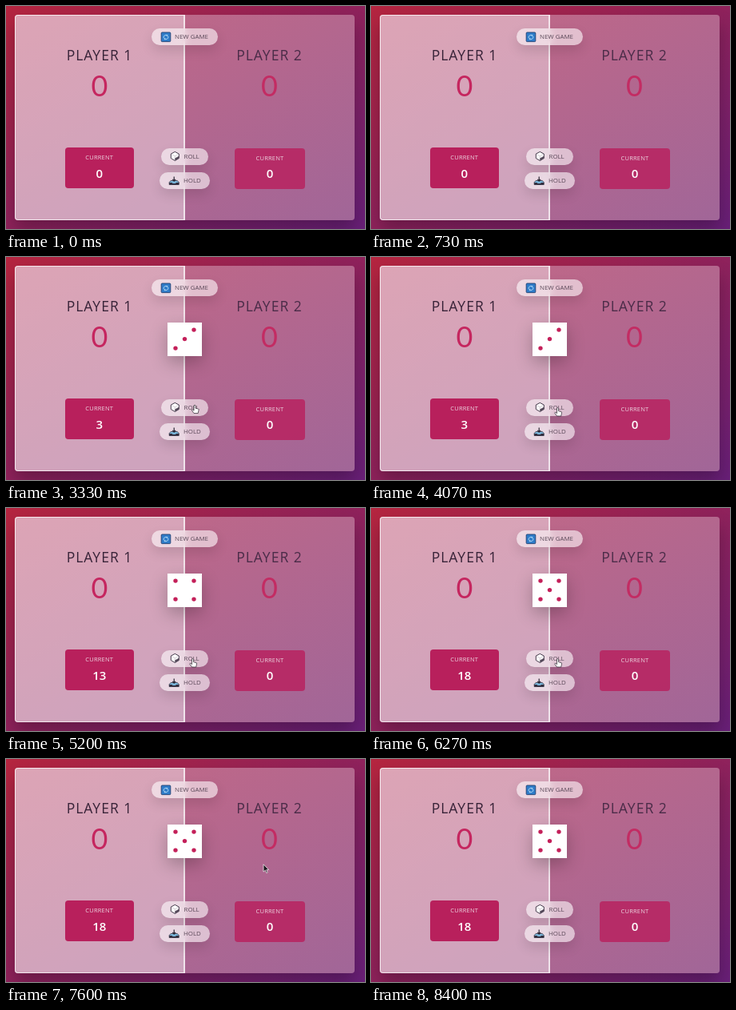
An HTML page that plays this animation: 449 by 279 pixels, repeating every 8540 ms.

```html
<!DOCTYPE html>
<html lang="en">
<head>
<meta charset="utf-8">
<title>Dice game</title>
<style>
  html, body { margin: 0; width: 100%; height: 100%; overflow: hidden; }
  body {
    position: relative;
    background: linear-gradient(to top left, #681f78, #b5253f);
    font-family: "Open Sans", "Noto Sans", sans-serif;
  }
  div, svg { position: absolute; box-sizing: border-box; }
  .card {
    left: 10.5px; top: 11px; width: 425.5px; height: 256.5px;
    border-radius: 4px;
    background: linear-gradient(to top left, #a16698, #c66884);
    box-shadow: 0 12px 21px rgba(0, 0, 0, .25);
  }
  .active {
    left: 10.5px; top: 11px; width: 213.5px; height: 256.5px;
    border: 1px solid rgba(255, 255, 255, .75);
    border-right: 2px solid rgba(255, 255, 255, .7);
    border-radius: 4px 0 0 4px;
    background: rgba(255, 255, 255, .4);
  }
  .player { top: 0; width: 212px; text-align: center; }
  .player div { left: 0; width: 100%; white-space: nowrap; }
  .name { top: 50px; font-size: 17.5px; line-height: 22px; font-weight: 500; letter-spacing: 1px; color: #382338; }
  .score { top: 79px; font: 36px/40px Lato, sans-serif; color: #c5265f; }
  .player .current {
    left: 62.5px; top: 177px; width: 86.5px; height: 51px;
    border-radius: 4px; background: #b8205c;
  }
  .label { top: 7px; font-size: 7.5px; line-height: 10px; letter-spacing: .2px; color: #ecd3df; }
  .points { top: 21.5px; font-size: 15px; line-height: 20px; font-weight: 600; color: #fff; }
  .second .name { font-weight: 400; top: 49.5px; color: #4a2c48; }
  .second .score { top: 78.5px; opacity: .9; }
  .player.second .current { top: 177.5px; width: 88px; background: rgba(184, 36, 96, .86); }
  .btn {
    border-radius: 11px; height: 21px;
    background: rgba(255, 255, 255, .58);
    backdrop-filter: blur(4px);
    box-shadow: 0 7px 15px rgba(0, 0, 0, .12);
    font-size: 7.9px; line-height: 21px; color: #5a4858; white-space: nowrap;
  }
  .dice {
    left: 202px; top: 81.5px; width: 43px; height: 42.5px;
    background: #fff; box-shadow: 0 8px 21px rgba(0, 0, 0, .25);
  }
  svg { left: 0; top: 0; }
</style>
</head>
<body>
<div class="card"></div>
<div class="active"></div>

<div class="player" style="left:11px">
  <div class="name">PLAYER 1</div>
  <div class="score">0</div>
  <div class="current"><div class="label">CURRENT</div><div class="points" id="points">0</div></div>
</div>
<div class="player second" style="left:223.5px">
  <div class="name">PLAYER 2</div>
  <div class="score">0</div>
  <div class="current"><div class="label">CURRENT</div><div class="points">0</div></div>
</div>

<div class="btn" style="left:182px;top:28px;width:83px;padding-left:29px">NEW GAME</div>
<div class="btn" style="left:194px;top:177.5px;width:59px;padding-left:28.5px">ROLL</div>
<div class="btn" style="left:192px;top:207.5px;width:63px;padding-left:30px">HOLD</div>
<div class="dice" id="dice"></div>

<svg width="449" height="279" viewBox="0 0 449 279" fill="none" stroke-linejoin="round">
  <!-- new game -->
  <rect x="194.2" y="33" width="11.6" height="11.6" rx="1" fill="#2f7cc8" stroke="#1f3f70" stroke-width=".9"/>
  <path d="M197.2 40a3 3 0 0 1 4.6-3.2M202.8 38a3 3 0 0 1-4.6 3.2" stroke="#a9d4f4" stroke-width="1"/>
  <path d="M201 35.4l2 1.8-2.4.8zM199 42.6l-2-1.8 2.4-.8z" fill="#a9d4f4"/>
  <!-- roll -->
  <path d="M211.3 182.4l5 2.6v5.5l-5 3-5-3V185z" fill="#fff" stroke="#33293a" stroke-width=".9"/>
  <path d="M206.3 185l5 2.7 5-2.7M211.3 187.7v5.8" stroke="#aaa0ac" stroke-width=".5"/>
  <path d="M211.3 190.5l5-2.7v2.7l-5 3z" fill="#55495a"/>
  <!-- hold -->
  <path d="M206.2 218.4h8l2 2.2v2.9h-12v-2.9z" fill="#79b4d8" stroke="#332c3c" stroke-width=".8"/>
  <path d="M204.2 221h3.4l.8 1h3.6l.8-1h3.4v2.5h-12z" fill="#332c3c"/>
  <path d="M210.2 213.4v5M208.4 217l1.8 2.2 1.8-2.2" stroke="#2b2634" stroke-width="1.2"/>
  <g id="dots" fill="#c4205a"></g>
  <g id="cursor" fill="#fff" stroke="#29212c" stroke-width=".7">
    <path id="hand" d="M-1 .8Q0-.6 1 .8V4.2L4.5 5Q5.2 5.3 5 6.5L4.2 10.5H-1L-3.6 6.8Q-3.6 5.4-2.3 6L-1 7.2Z"/>
    <path id="arrow" d="M0 0V9.4L2.2 7.4L3.7 10.8L5.2 10.1L3.7 6.9H6.6Z" fill="#1d181f" stroke="#fff"/>
  </g>
</svg>

<script>
const LOOP = 8540;
const el = id => document.getElementById(id);

// [step, face, total], 15 steps per second
const rolls = [[0, 0, 0], [49, 3, 3], [62, 4, 9], [75, 4, 13], [94, 5, 18]];
const faces = {
  3: [[1, -1], [0, 0], [-1, 1]],
  4: [[-1, -1], [1, -1], [-1, 1], [1, 1]],
  5: [[-1, -1], [1, -1], [0, 0], [-1, 1], [1, 1]]
};

// [step, x, y, easing towards this point]
const easeOut = p => 1 - (1 - p) ** 2;
const easeIn = p => p ** 1.6;
const path = [
  [25, 440, 70],
  [35, 236, 185, easeOut],
  [57, 236, 185, easeOut],
  [59, 233.5, 188.5, easeOut],
  [111, 233.5, 188.5, easeOut],
  [116, 434, 60, easeIn]
];

function pointAt(step) {
  const i = path.findIndex(p => p[0] >= step);
  if (i < 0 || step < path[0][0]) return null;
  if (i === 0) return path[0].slice(1, 3);
  const [s0, x0, y0] = path[i - 1], [s1, x1, y1, ease] = path[i];
  const k = ease((step - s0) / (s1 - s0));
  return [x0 + (x1 - x0) * k, y0 + (y1 - y0) * k];
}

const show = (node, on) => { node.style.display = on ? "" : "none"; };

function drawRoll(step) {
  const [, face, total] = rolls.filter(r => r[0] <= step).pop();
  el("points").textContent = total;
  show(el("dice"), face);
  el("dots").innerHTML = (faces[face] || []).map(([x, y]) =>
    `<circle cx="${223.5 + x * 11.5}" cy="${102.6 + y * 11.5}" r="2.7"/>`).join("");
}

function drawCursor(step) {
  const p = pointAt(step);
  show(el("cursor"), p);
  if (!p) return;
  const [x, y] = p;
  const over = x > 194 && x < 253 && y > 177 && y < 199;
  show(el("hand"), over);
  show(el("arrow"), !over);
  el("cursor").setAttribute("transform", `translate(${x} ${y})`);
}

let last = -1;
function tick() {
  const step = Math.floor((performance.now() % LOOP) * .015 + .1);
  if (step !== last) {
    last = step;
    drawRoll(step);
    drawCursor(step);
  }
  requestAnimationFrame(tick);
}
tick();
</script>
</body>
</html>
```
